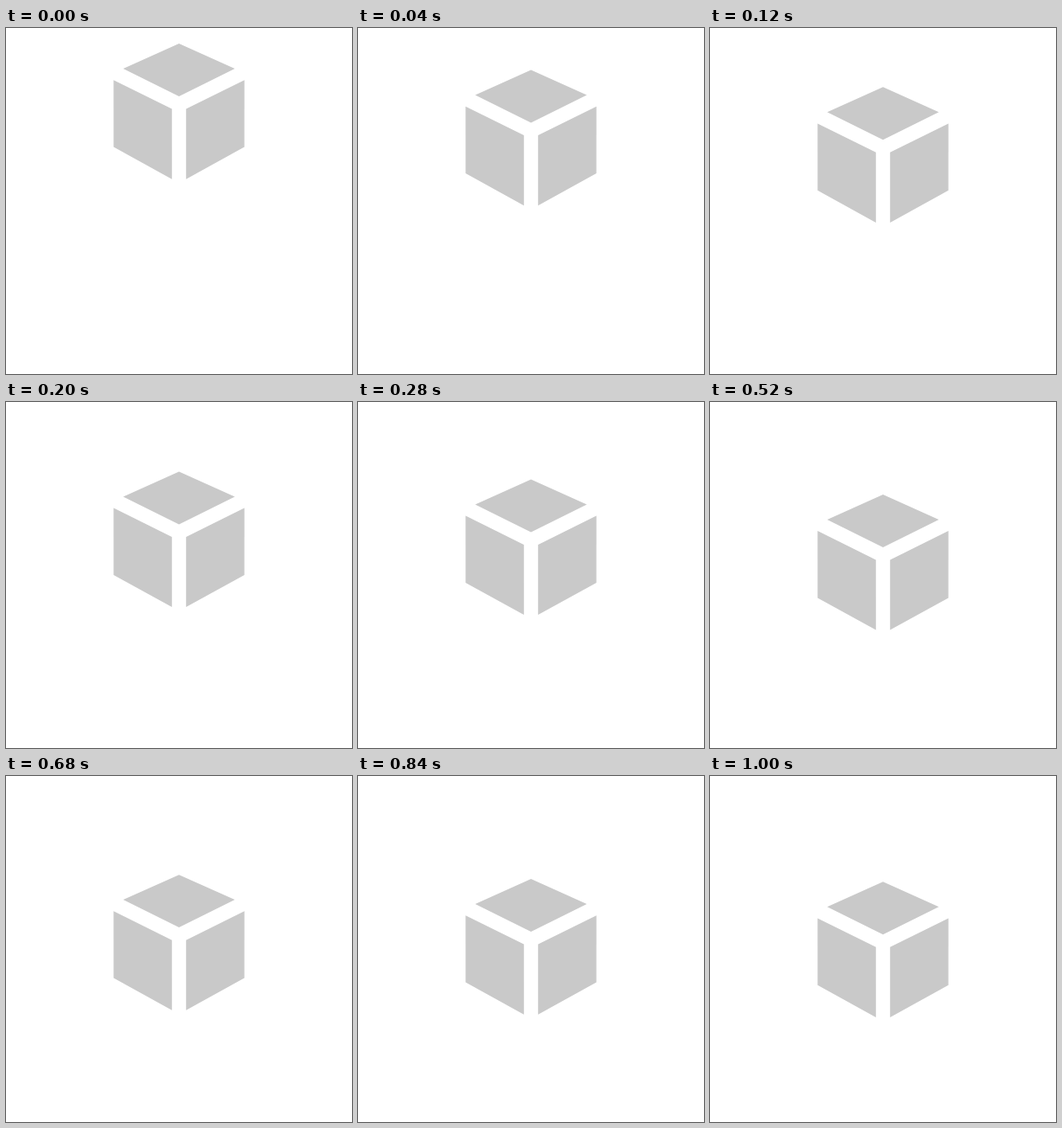
Animation, 400 px wide and 400 px high, one loop 2.04 s. Source, as an HTML page:

```html
<!DOCTYPE html>
<html lang="en">
<head>
<meta charset="utf-8">
<title>Dropping cube</title>
<style>
  html, body { margin: 0; width: 100%; height: 100%; overflow: hidden; background: #fff; }
  svg { display: block; width: 100%; height: 100%; }
</style>
</head>
<body>
<svg viewBox="0 0 400 400">
  <g id="cube" fill="#c9c9c9">
    <path d="M200 18.1 264.5 47 200 79 135.5 47Z"/>
    <path d="M124.4 60.2 191.8 93.6V174.7L124.4 137.5Z"/>
    <path d="M275.6 60.2 208.2 93.6V174.7L275.6 137.5Z"/>
  </g>
</svg>
<script>
  const LOOP = 2040, FALL = 1000, STEP = 40, DISTANCE = 104.2;
  const cube = document.getElementById('cube');

  // Cubic Bézier with x = s²: a fast drop that settles slowly.
  function ease(t) {
    const s = Math.sqrt(t), r = 1 - s;
    return 1 - (r ** 3 + 3 * r * r * s * 0.485 + 3 * r * s * s * 0.1);
  }

  function draw(now) {
    const time = Math.floor((now % LOOP) / STEP) * STEP;
    const y = DISTANCE * ease(Math.min(time / FALL, 1));
    cube.setAttribute('transform', `translate(0 ${y.toFixed(2)})`);
  }

  const start = performance.now();
  function tick() {
    draw(performance.now() - start);
    requestAnimationFrame(tick);
  }
  tick();
</script>
</body>
</html>
```
